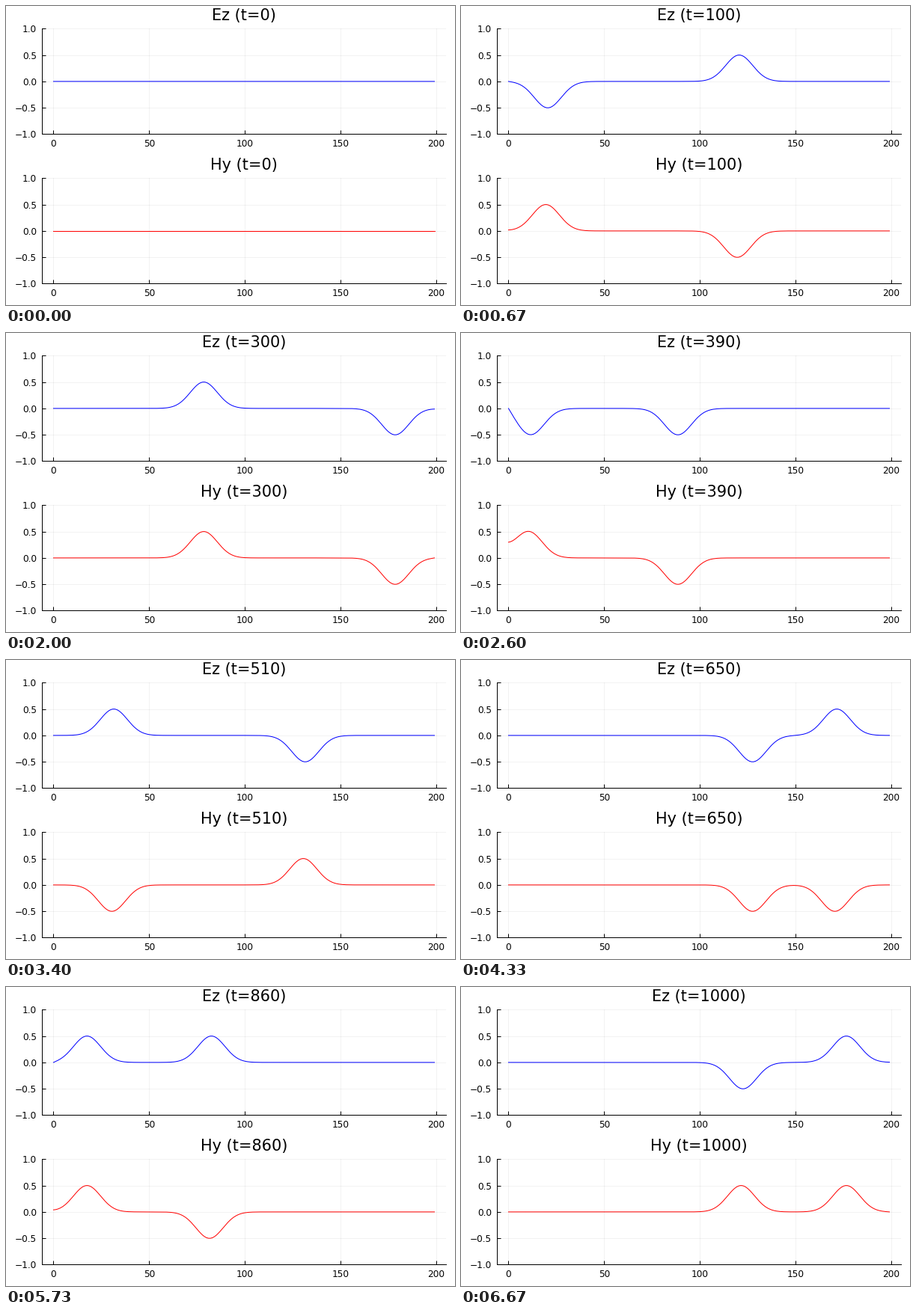
Recreate the animation shown at these times as a matplotlib script. Size 600x400 px, loop 6740 ms.

```python
import numpy as np
import matplotlib.pyplot as plt
from matplotlib.animation import FuncAnimation

CELLS, STEPS, STRIDE = 200, 1000, 10
SOURCE, DELAY, WIDTH2 = 50, 30, 100
LOOP_MS, TICK_MS, FPS = 6740, 20, 15
W, H, DPI = 600, 400, 100
LEFT, RIGHT = 48.2, 587.8


def pt(px):
    return px * 72 / DPI


def simulate():
    """1D Yee scheme at Courant number 1 with an additive Gaussian source."""
    ez, hy = np.zeros(CELLS), np.zeros(CELLS)
    states = []
    for t in range(STEPS + 1):
        hy[:-1] += ez[1:] - ez[:-1]
        ez[1:] += hy[1:] - hy[:-1]
        ez[SOURCE] += np.exp(-(t - DELAY) ** 2 / WIDTH2)
        if t % STRIDE == 0:
            states.append((ez.copy(), hy.copy()))
    return states


def make_panel(fig, top, color):
    bottom = top + 141
    ax = fig.add_axes([LEFT / W, 1 - bottom / H, (RIGHT - LEFT) / W, 141 / H])
    margin = 0.03 * (CELLS - 1)
    ax.set(xlim=(-margin, CELLS - 1 + margin), ylim=(-1, 1),
           xticks=range(0, 201, 50), yticks=np.linspace(-1, 1, 5))
    ax.spines[["top", "right"]].set_visible(False)
    ax.spines[["left", "bottom"]].set_linewidth(pt(1))
    ax.tick_params(direction="in", length=pt(5), width=pt(1),
                   labelsize=pt(12.1))
    ax.tick_params(axis="x", pad=pt(6.5))
    ax.tick_params(axis="y", pad=pt(7))
    ax.grid(color="black", alpha=0.05, linewidth=pt(1))
    ax.set_axisbelow(True)
    line, = ax.plot(np.arange(CELLS), np.zeros(CELLS), color=color,
                    linewidth=pt(1), clip_on=False)
    title = fig.text((LEFT + RIGHT) / 2 / W, 1 - (top - 11.7) / H, "",
                     size=pt(20.9), ha="center", va="baseline")
    return line, title


plt.rcParams["font.family"] = "DejaVu Sans"
fig = plt.figure(figsize=(W / DPI, H / DPI), dpi=DPI, facecolor="white")
panels = [make_panel(fig, 30.4, "blue"), make_panel(fig, 230.4, "red")]
states = simulate()


def update(tick):
    # 15 pictures a second, each starting on the nearest 10 ms
    ms = (tick + 0.5) * TICK_MS + 5
    i = min(int(ms * FPS / 1000), len(states) - 1)
    for (line, title), name, field in zip(panels, ("Ez", "Hy"), states[i]):
        line.set_ydata(field)
        title.set_text(f"{name} (t={i * STRIDE})")
    return [artist for panel in panels for artist in panel]


anim = FuncAnimation(fig, update, frames=LOOP_MS // TICK_MS,
                     interval=TICK_MS, repeat=True, repeat_delay=0,
                     blit=False)
plt.show()
```
